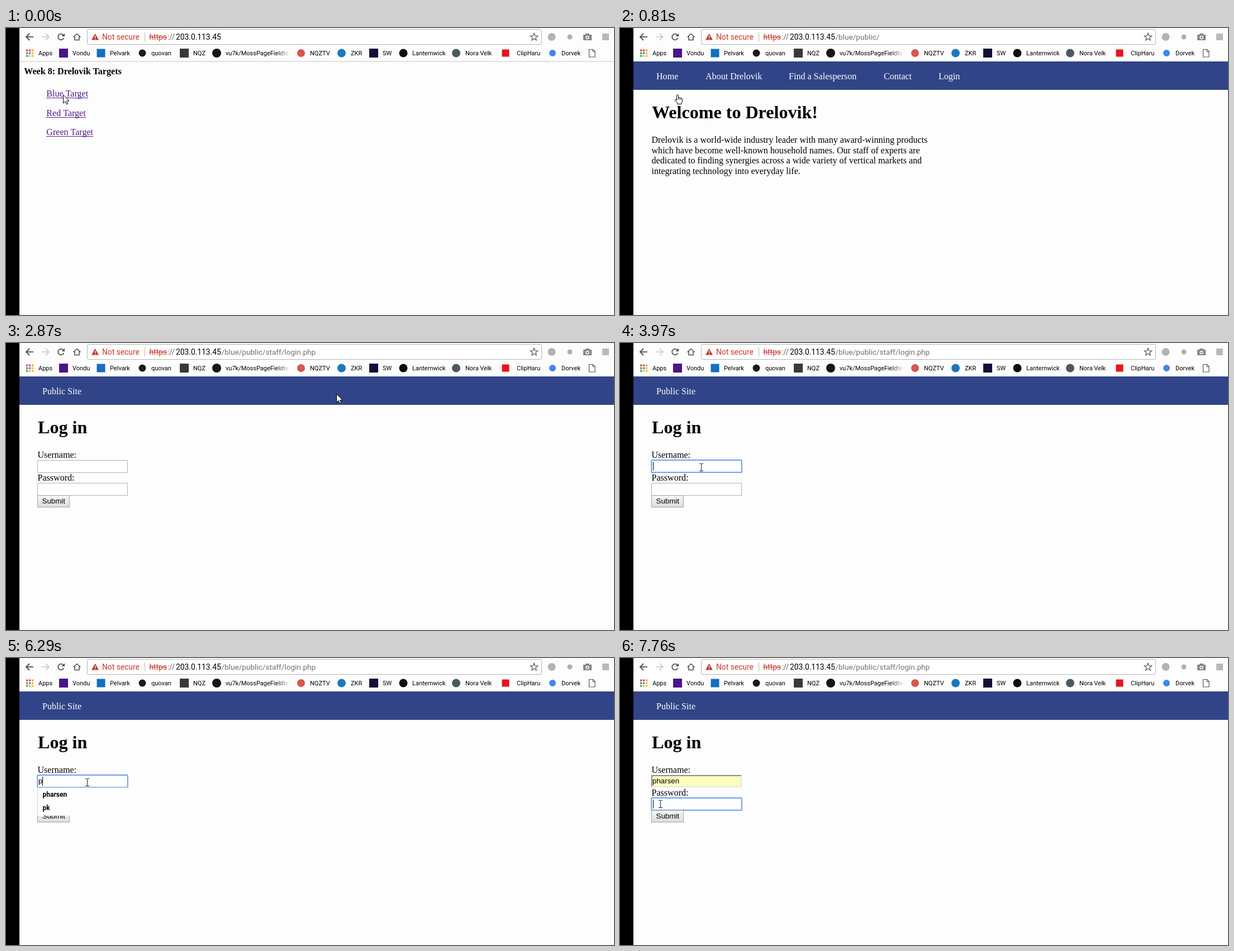
An HTML page with a canvas that plays this animation: 1088x515 px, repeating every 8 s.

```html
<!DOCTYPE html>
<html lang="en">
<head>
<meta charset="utf-8">
<title>Login walkthrough</title>
<style>
html, body { margin: 0; width: 100%; height: 100%; overflow: hidden; background: #fdfdfd; }
canvas { display: block; }
</style>
</head>
<body>
<canvas id="stage" width="1088" height="515"></canvas>
<script>
const ctx = document.getElementById('stage').getContext('2d');
const LOOP = 8000;
const UI = 'Roboto, "Noto Sans", sans-serif';
const SERIF = '"Liberation Serif", "Times New Roman", serif';
const SANS = '"Liberation Sans", Arial, sans-serif';
const BODY = `16.07px ${SERIF}`;
const TITLE = `bold 32.1px ${SERIF}`;
const FIELD = `13.33px ${SANS}`;
const BRAND = 'Drelovik';
const USER = 'pharsen';
const HOST = '203.0.113.45';

// Pointer poses: start time, shape, hotspot
const pointer = [
  [0, 'arrow', 102, 119.5], [810, 'hand', 103, 119], [1620, 'hand', 374, 71],
  [1760, 'arrow', 587, 100], [1910, 'arrow', 602, 106], [2030, 'arrow', 607, 104],
  [2180, 'arrow', 601, 98], [2310, 'hand', 593, 92], [2460, 'hand', 593, 91],
  [2870, 'arrow', 591, 91], [3280, 'arrow', 479, 120], [3430, 'beam', 165, 222],
  [3580, 'beam', 147, 242], [3700, 'beam', 145, 234], [3850, 'beam', 145, 223],
  [6440, 'arrow', 118, 237], [6560, 'arrow', 84, 241], [6680, 'arrow', 72, 242],
  [7240, 'beam', 72, 244], [7490, 'beam', 72, 254], [7620, 'beam', 72, 262]
];

// Bookmarks: label, label x, icon shape, icon centre x, icon size, colour
const bookmarks = [
  ['Vondu', 119, 'square', 103, 16, '#4a148c'],
  ['Pelvark', 186, 'square', 170, 15, '#1270c0'],
  ['quovan', 260, 'circle', 244, 13, '#1c1a18'],
  ['NQZ', 335, 'square', 319, 16, '#38393b'],
  ['vu7k/MossPageFieldtest', 393, 'circle', 377, 16, '#161616'],
  ['NQZTV', 544, 'circle', 528, 14, '#d9564a'],
  ['ZKR', 617, 'circle', 600.5, 15, '#1a78bd'],
  ['SW', 674, 'square', 658, 16, '#12103a'],
  ['Lanternwick', 727, 'circle', 711, 15, '#0c0c0c'],
  ['Nora Velk', 822, 'circle', 805.5, 15, '#4b5a60'],
  ['ClipHaru', 914, 'square', 894, 13, '#e8141c'],
  ['Dorvek', 994, 'circle', 978, 12, '#4285f4']
];

function rect(x, y, w, h, color) {
  ctx.fillStyle = color;
  ctx.fillRect(x, y, w, h);
}

function text(str, x, y, font, color = '#000') {
  ctx.font = font;
  ctx.fillStyle = color;
  ctx.fillText(str, x, y);
}

function path(points, closed) {
  ctx.beginPath();
  points.forEach(([x, y]) => ctx.lineTo(x, y));
  if (closed) ctx.closePath();
}

function line(points, color, width = 1, closed = false) {
  path(points, closed);
  ctx.strokeStyle = color;
  ctx.lineWidth = width;
  ctx.stroke();
}

function shape(points, color) {
  path(points, true);
  ctx.fillStyle = color;
  ctx.fill();
}

function icon(kind, x, y, size, color) {
  if (kind === 'square') return rect(x - size / 2, y - size / 2, size, size, color);
  ctx.beginPath();
  ctx.arc(x, y, size / 2, 0, Math.PI * 2);
  ctx.fillStyle = color;
  ctx.fill();
}

function frame(x, y, w, h, color, width = 1) {
  ctx.strokeStyle = color;
  ctx.lineWidth = width;
  ctx.strokeRect(x, y, w, h);
}

function drawButtons(loading) {
  const ink = '#505050';
  const arrow = (x, dir, color) => {
    line([[x, 10], [x - 6 * dir, 16], [x, 22]], color, 1.8);
    line([[x - 5 * dir, 16], [x + 7 * dir, 16]], color, 1.8);
  };
  arrow(42, 1, ink);
  arrow(71, -1, '#cfcfcf');

  if (loading) {
    line([[94, 11], [104, 21]], ink, 1.8);
    line([[104, 11], [94, 21]], ink, 1.8);
  } else {
    ctx.beginPath();
    ctx.arc(98.5, 16, 5.3, 0.35, Math.PI * 1.75);
    ctx.strokeStyle = ink;
    ctx.lineWidth = 1.8;
    ctx.stroke();
    shape([[105, 9.5], [105, 15], [99.5, 15]], ink);
  }

  line([[120.5, 16.5], [127, 10.5], [133.5, 16.5]], ink, 1.6);
  line([[123, 15], [123, 21.5], [131, 21.5], [131, 15]], ink, 1.6);
}

function drawAddress(route) {
  ctx.beginPath();
  ctx.roundRect(145.5, 2.5, 813, 27, 2);
  ctx.fillStyle = '#fff';
  ctx.fill();
  ctx.strokeStyle = '#b4b4b4';
  ctx.lineWidth = 1;
  ctx.stroke();

  const red = '#c8372b';
  const font = `13.8px ${UI}`;
  shape([[159.5, 10], [166, 21.5], [153, 21.5]], red);
  rect(159, 14, 1.3, 4, '#fff');
  rect(159, 19, 1.3, 1.3, '#fff');
  text('Not secure', 172, 21, font, red);
  rect(248, 8, 1, 16, '#b8b8b8');
  text('https', 256.5, 21, font, red);
  rect(256, 16, 32, 1, red);
  text('://', 289, 21, font, '#666');
  text(HOST, 304, 21, font, '#000');
  text(route, 385.5, 21, `13.6px ${UI}`, '#707070');

  const star = Array.from({ length: 10 }, (_, i) => {
    const r = i % 2 ? 3 : 7;
    const a = i * Math.PI / 5 - Math.PI / 2;
    return [945 + r * Math.cos(a), 16.3 + r * Math.sin(a)];
  });
  line(star, '#5c5c5c', 1.3, true);
}

function drawExtensions() {
  icon('circle', 976.5, 16, 14, '#b3b3b3');
  icon('circle', 1009, 16, 9, '#b0b0b0');
  rect(1033, 12, 15, 10, '#848484');
  rect(1037, 10, 7, 3, '#848484');
  icon('circle', 1040.5, 17, 6.5, '#fff');
  icon('circle', 1040.5, 17, 3.5, '#848484');
  icon('square', 1073, 16, 12, '#b9b9b9');
}

function drawBookmarks() {
  const font = `11px ${UI}`;
  const ink = '#000';
  const palette = ['#e8453c', '#e8453c', '#f2a33a', '#3aa757', '#4285f4', '#f9bb2d', '#3aa757', '#f9bb2d', '#f9bb2d'];
  palette.forEach((c, i) => rect(36 + (i % 3) * 5, 38.5 + Math.floor(i / 3) * 5, 3.3, 3.3, c));
  text('Apps', 58, 49, font, ink);

  for (const [label, x, kind, cx, size, color] of bookmarks) {
    icon(kind, cx, 45, size, color);
    if (label.length < 15) {
      text(label, x, 49, font, ink);
      continue;
    }
    const fade = ctx.createLinearGradient(484, 0, 508, 0);
    fade.addColorStop(0, ink);
    fade.addColorStop(1, 'rgba(0,0,0,0)');
    text(label, x, 49, font, fade);
  }

  line([[1043.5, 38.5], [1050.5, 38.5], [1054, 42], [1054, 52], [1043.5, 52]], '#555', 1.2, true);
  line([[1050, 38.5], [1050, 42.5], [1054, 42.5]], '#555');
}

function drawTargets(t) {
  rect(24, 59.5, 1064, 1, '#c4c4c4');
  text(`Week 8: ${BRAND} Targets`, 32.3, 83, `bold ${BODY}`);
  ['Blue', 'Red', 'Green'].forEach((name, i) => {
    const label = `${name} Target`;
    const y = Math.round(123 + i * 34.6);
    const color = i === 0 && t >= 120 && t < 390 ? '#f00' : '#551a8b';
    text(label, 72.3, y, BODY, color);
    rect(72, y + 2, Math.ceil(ctx.measureText(label).width), 1, color);
  });
}

function drawNav(items) {
  rect(24, 60, 1064, 51, '#304487');
  items.forEach(([label, x]) => text(label, x, 92, BODY, '#fff'));
}

function drawHome() {
  drawNav([['Home', 65], [`About ${BRAND}`, 153], ['Find a Salesperson', 302], ['Contact', 472], ['Login', 570]]);
  text(`Welcome to ${BRAND}!`, 57, 162, TITLE);
  [
    `${BRAND} is a world-wide industry leader with many award-winning products`,
    'which have become well-known household names. Our staff of experts are',
    'dedicated to finding synergies across a wide variety of vertical markets and',
    'integrating technology into everyday life.'
  ].forEach((row, i) => text(row, 56.5, Math.round(206 + i * 18.6), BODY));
}

function drawField(y, { focused, filled, value = '', caret }) {
  rect(56, y, 162, 22, filled ? '#faffbd' : '#fff');
  if (focused) {
    ctx.beginPath();
    ctx.roundRect(56.2, y + 0.2, 161.6, 22, 1);
    ctx.strokeStyle = '#5a94ea';
    ctx.lineWidth = 1.7;
    ctx.stroke();
  } else if (filled) {
    rect(56, y, 162, 2, '#8c8c8c');
    rect(56, y, 2, 22, '#8c8c8c');
    rect(57, y + 20, 161, 2, '#e8e8e8');
    rect(216, y + 1, 2, 21, '#e8e8e8');
  } else {
    frame(56.5, y + 0.5, 161, 22, '#b0b0b0');
  }
  text(value, 58, y + 15, FIELD);
  if (caret) rect(value ? 65 : 59, y + 3, 1, 16, '#000');
}

function drawSuggestions(highlight) {
  rect(56, 232, 164, 51, '#fefefe');
  rect(56, 232, 164, 1, '#c9c9c9');
  rect(56, 232, 1, 51, '#d2d2d2');
  if (highlight) rect(57, 233, 161, 25, '#cdcdcd');
  text(USER, 65.5, 248.5, `bold 12px ${UI}`);
  text('pk', 65.5, 273, `bold 12px ${UI}`);
}

function drawLogin(t) {
  drawNav([['Public Site', 65]]);
  text('Log in', 57, 162, TITLE);

  const filled = t >= 6440;
  const toPassword = t >= 7760;
  const typed = t >= 5260;
  const caretOn = t >= 3850 && !filled && !(t >= 4500 && t < 5120) && !(t >= 5790 && t < 6290);
  text('Username:', 56.5, 206, BODY);
  drawField(210, {
    focused: t >= 3850 && !toPassword,
    filled,
    value: filled ? USER : typed ? 'p' : '',
    caret: caretOn
  });
  text('Password:', 56.5, 247, BODY);
  drawField(251, { focused: toPassword, caret: toPassword });

  const face = ctx.createLinearGradient(0, 273, 0, 295);
  face.addColorStop(0, '#f7f7f7');
  face.addColorStop(1, '#dcdcdc');
  rect(56, 274, 58, 21, face);
  frame(56.5, 273.5, 57, 21, '#a3a3a3');
  text('Submit', 64.5, 288, FIELD);

  if (typed && t < 7240) drawSuggestions(filled);
}

const cursors = {
  arrow() {
    const outline = [[0.5, 0.5], [0.5, 15.5], [4, 12.3], [6.3, 17.5], [8.7, 16.5], [6.5, 11.5], [11, 11.2]];
    shape(outline, '#fff');
    line(outline, '#000', 1, true);
  },
  hand() {
    const outline = [
      [-1.5, 1.5], [0, 0.5], [1.5, 1.5], [1.5, 6], [4, 6], [6.5, 7], [8.5, 8.5], [8.8, 12],
      [7, 15], [7, 17.5], [-0.5, 17.5], [-0.5, 15.5], [-4.5, 10.5], [-4, 9], [-1.5, 10.5]
    ];
    shape(outline, '#fff');
    line(outline, '#000', 1, true);
    [1.5, 4, 6.5].forEach((x, i) => line([[x, 6 + i * 0.5], [x, 10]], '#000', 0.8));
  },
  beam() {
    rect(0, -6, 1, 13, '#222');
    for (const y of [-7, 6]) {
      rect(-3, y, 3, 1, '#222');
      rect(1, y, 3, 1, '#222');
    }
  }
};

function drawPointer(t) {
  const [, kind, x, y] = pointer.findLast(([start]) => start <= t);
  ctx.save();
  ctx.translate(x, y);
  cursors[kind]();
  ctx.restore();
}

function draw(t) {
  rect(0, 0, 1088, 515, '#fdfdfd');
  rect(0, 0, 24, 515, '#000');
  drawButtons(t >= 390 && t < 810);
  drawAddress(t < 810 ? '' : t < 2740 ? '/blue/public/' : '/blue/public/staff/login.php');
  drawExtensions();
  drawBookmarks();
  if (t < 810) drawTargets(t);
  else if (t < 2740) drawHome();
  else drawLogin(t);
  drawPointer(t);
}

const begin = performance.now();
function tick() {
  draw((performance.now() - begin) % LOOP);
  requestAnimationFrame(tick);
}
tick();
</script>
</body>
</html>
```
